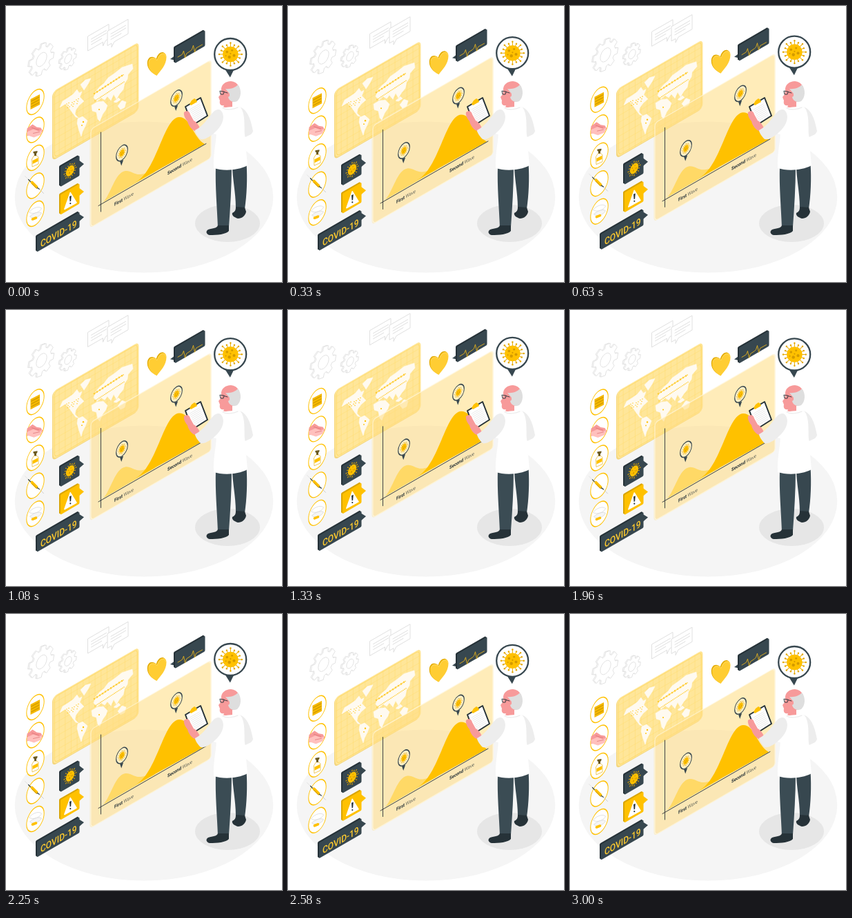
Animation of 400x400 px, one loop 3040 ms. Source, as an HTML page:

```html
<!DOCTYPE html>
<html lang="en">
<head>
<meta charset="utf-8">
<title>Two waves</title>
<style>
html, body { margin: 0; width: 100%; height: 100%; overflow: hidden; background: #fff; }
svg { display: block; width: 100vw; height: 100vh; }
text { font-family: Roboto, Inter, sans-serif; }
</style>
</head>
<body>
<svg id="stage" viewBox="0 0 400 400"></svg>
<script>
const GOLD = '#ffc100', DARK = '#37474f', INK = '#263238', LINE = '#e0e0e0', SKIN = '#f79a9a';
const SLOPE = 0.577, ISO = 0.866;

const path = (d, fill = 'none', extra = '') => `<path d="${d}" fill="${fill}" ${extra}/>`;
const line = (d, color, width = 1) =>
  path(d, 'none', `stroke="${color}" stroke-width="${width}" stroke-linecap="round" stroke-linejoin="round"`);
const circle = (x, y, r, fill, extra = '') => `<circle cx="${x}" cy="${y}" r="${r}" fill="${fill}" ${extra}/>`;
const iso = (x, y, content, sx = ISO) =>
  `<g transform="matrix(${sx} -0.5 0 1 ${x} ${y})">${content}</g>`;
const float = (amp, content, period = 3000) =>
  `<g class="float" data-amp="${amp}" data-period="${period}">${content}</g>`;

// Rounded isometric sheet: x, y is its top left corner, w its width on screen.
const sheet = (x, y, w, h, r, fill, extra = '') =>
  iso(x, y, `<rect width="${w / ISO}" height="${h}" rx="${r}" fill="${fill}" ${extra}/>`);

function virus(r) {
  let spikes = '';
  for (let i = 0; i < 16; i++) {
    const a = i * Math.PI / 8, reach = r * (i % 2 ? 1.28 : 1.45);
    const x = Math.cos(a) * reach, y = Math.sin(a) * reach;
    spikes += line(`M0 0L${x} ${y}`, '#e5a900', r * 0.09) + circle(x, y, r * 0.11, '#e5a900');
  }
  const spots = [[-.45, -.3, .16], [.2, -.5, .13], [.45, .15, .18], [-.15, .35, .2], [0, -.08, .1], [-.6, .2, .09]];
  return spikes + circle(0, 0, r, GOLD) +
    spots.map(([x, y, s]) => circle(x * r, y * r, s * r, '#d49b00')).join('');
}

function gear(r) {
  const points = [];
  for (let i = 0; i < 8; i++) {
    for (const [da, k] of [[-.28, .76], [-.18, 1], [.18, 1], [.28, .76]]) {
      const a = i * Math.PI / 4 + 0.2 + da;
      points.push(`${(Math.cos(a) * r * k).toFixed(1)} ${(Math.sin(a) * r * k).toFixed(1)}`);
    }
  }
  const style = `stroke="${LINE}" stroke-width=".9" stroke-linejoin="round"`;
  const shape = path(`M${points.join('L')}Z`, '#fff', style);
  return `<g transform="translate(-2 -1.2)">${shape}</g>${shape}` + circle(0, 0, r * .42, '#fff', style);
}

function bubble(x, y, w, h, tail) {
  const style = `stroke="${LINE}" stroke-width="1" stroke-linejoin="round"`;
  const outline = `M${x} ${y}l${w} ${-w * SLOPE}v${h}l${tail - w} ${(w - tail) * SLOPE}l-4 8v-5.7l${4 - tail} ${(tail - 4) * SLOPE}z`;
  let rows = '';
  for (const [dy, len] of [[5, .72], [9, .72], [13, .5]]) {
    rows += line(`M${x + 5} ${y + dy - 1}l${w * len} ${-w * len * SLOPE}`, LINE, 1);
  }
  return path(outline, '#fff', style) + rows;
}

function sign(x, y, w, h, front, side, content) {
  return sheet(x - 2, y - 1.2, w, h, 1.5, side) + sheet(x - 1, y - .6, w, h, 1.5, side) +
    sheet(x, y, w, h, 1.5, front) + content;
}

function waveMarker(x, y) {
  return path(`M${x - 3} ${y + 12}l2.2 6.5l3 -8.5z`, DARK) +
    iso(x, y, circle(0, 0, 10.4, '#fff0c6', `stroke="${DARK}" stroke-width="1.4"`) + virus(4.6), 0.8);
}

function badge(y, content) {
  return iso(42.5, y, circle(0, 0, 16.5, '#fff', `stroke="${GOLD}" stroke-width="1.3"`), 0.77) +
    `<g transform="translate(42.5 ${y})">${content}</g>`;
}

function worldMap() {
  const land = [
    'M78 147L82 138 90 133 97 128 103 121 106 126 110 124 107 132 113 138 106 144 101 151 100 157 105 162 101 161 95 153 91 147 86 142Z',
    'M104 163L111 160 118 166 115 174 111 182 109 189 106 181 103 170Z',
    'M108 114L115 107 123 105 119 113 113 122Z',
    'M127 133L130 124 136 117 142 112 148 104 158 97 168 89 183 84 184 91 177 99 176 106 172 112 170 121 165 127 160 135 156 128 152 137 147 131 143 136 138 133 132 138Z',
    'M124 144L132 139 141 138 147 144 145 150 140 157 136 167 133 164 131 154 125 152Z',
    'M162 145L168 137 174 139 172 147 166 150Z', 'M156 139L163 133 166 136 160 140Z'
  ];
  let grid = '', cases = '';
  for (let u = 10; u < 143; u += 10) grid += `M${u} 1v98`;
  for (let v = 10; v < 98; v += 10) grid += `M1 ${v}h141`;
  for (let i = 0; i < 44; i++) {
    const x = 128 + (i * 17) % 44, y = 137 - (x - 128) * .65 + (i * 11) % 22 - 10;
    cases += circle(x, y, i % 4 ? .8 : 1.3, '#ffcc33');
  }
  for (let i = 0; i < 14; i++) {
    cases += circle(88 + (i * 7) % 20, 145 - (i * 7) % 20 * .5 + (i * 5) % 9 - 3, .8, '#ffcc33');
  }
  cases += circle(112, 168, 1.2, GOLD) + circle(110, 173, .9, GOLD) + circle(135, 150, 1, GOLD);
  return sheet(67, 125.5, 124, 99, 6, '#f5cd55', 'opacity=".75"') +
    sheet(68.5, 123.5, 124, 99, 6, '#ffe699') +
    iso(68.5, 123.5, path(grid, 'none', 'stroke="#ffda6a" stroke-width=".6" opacity=".65"')) +
    sheet(70.5, 124.5, 120, 95, 5, 'none', 'stroke="#ffda6a" stroke-width=".9"') +
    path(land.join(''), '#fffaf0', 'stroke="#fffaf0" stroke-width=".5" stroke-linejoin="round"') + cases;
}

function board() {
  return sheet(121.5, 180, 174.5, 142, 5, '#ffd978', 'opacity=".3"') +
    sheet(123, 178.5, 174.5, 142, 5, '#ffde89', 'opacity=".38"') +
    sheet(123, 178.5, 174.5, 142, 5, 'none', 'stroke="#fff7dd" stroke-width="1.2" opacity=".85"');
}

function chart() {
  const label = (x, y, bold, light) => iso(x, y,
    `<text font-size="6.9" fill="${INK}"><tspan font-weight="700">${bold}</tspan><tspan font-weight="300"> ${light}</tspan></text>`);
  return path('M141 284C152 273 158 241 173 239C182 238 187 247 200 243L217 240Z', '#ffd966') +
    path('M187 256C219 240 228 162 251 161C268 161 271 191 288 200Z', GOLD) +
    line('M137.5 183V298M134 289.5L290 199.5', INK, .9) +
    label(157, 290, 'First', 'Wave') + label(234, 245, 'Second', 'Wave') +
    waveMarker(168, 213) + waveMarker(247, 133.5);
}

function heart() {
  const d = 'M218.5 101C213 98 206 93 206 84C206 75 213 72 219 77.5C222 66 232.5 65 232.5 74C232.5 86 223.5 94 218.5 101Z';
  return `<g transform="translate(-1.2 -1)">${path(d, '#e0a800')}</g>` + path(d, '#ffcd33') +
    line('M207 81C208 76 214 74 219 78.5C222 69 230 66 231.5 73', '#ffda66', .8);
}

function pulse() {
  return path('M246 71l-8 6l8 2z', DARK) + sign(245, 60.5, 43.5, 22.5, DARK, INK,
    line('M249 74l5 -3l1.5 -1l2 -5l2 10l2 -6l6 -4l2 -2l2 -6l2 10l2 -6l9 -5', '#e5b21c', .9));
}

function sideSigns() {
  const warning = path('M93.2 270.5L102 285 84.8 294.5Z', '#fff', 'stroke="#fff" stroke-width="1.5" stroke-linejoin="round"') +
    path('M92 276l2.8 -1.2l-.7 8l-1.5 .8z', INK) + circle(93.3, 286.2, 1.1, INK);
  const name = iso(50, 350, '<text font-size="13.9" font-weight="500" fill="#ffcb2e">COVID-19</text>');
  return path('M105 223l8 6l-8 7z', DARK) + sign(79, 233, 27.5, 29, DARK, INK, iso(93, 238.8, virus(7))) +
    path('M105 263l8 6l-8 7z', GOLD) + sign(79, 273.5, 27.5, 29, GOLD, '#d9a400', warning) +
    path('M105 301l8 5l-8 7z', DARK) + sign(45, 334, 61.5, 22.5, DARK, INK, name);
}

function badges() {
  const mask = path('M-7 -4L6.5 -11V4L-7 11Z', '#f5b900') +
    line('M-6 -1L5.5 -7M-6 3L5.5 -3M-6 7L5.5 1', '#b98700', .8);
  const wash = path('M-12 -2L-4 -8L2 -4L8 -3L11 2L4 7L-4 6L-12 9Z', SKIN) +
    path('M-12 3L-3 -1L5 2L10 0L8 7L-2 11L-11 8Z', '#ffc0bd') + line('M-5 -3L5 0M-3 5L6 3', '#d96f72', .7);
  const bottle = path('M-5 2L-2 -3H2L4.5 -1V9L-4.5 13Z', '#fff', 'stroke="#e5b21c" stroke-width=".7"') +
    path('M-4 4L4 0V5L-4 9Z', GOLD) + path('M-1.5 -3V-6L-3 -7V-9L3 -10V-8L1.5 -6V-3Z', '#6b5a20');
  const syringe = line('M-15 -14L-10 -9', LINE, .9) + line('M-10 -9L-6 -5', DARK, 1.2) + line('M-5 -5L2 2', GOLD, 4) +
    line('M-5 -3L2 4', '#b98700', .8) + line('M3 3L6 5', DARK, 1.4) + line('M6 5L12 11', '#bbb', .7);
  const outline = 'stroke="#d5d5d5" stroke-width=".7"';
  const pills = path('M-9 -2C-6 -7 4 -12 9 -8C8 -3 -3 2 -9 -2Z', '#fff', outline) +
    path('M-8 4C-4 0 5 -4 9 -1C7 4 -3 9 -8 4Z', '#f5f5f5', outline) + line('M-4 8L1 6', GOLD, 3.6);
  return [mask, wash, bottle, syringe, pills].map((icon, i) => badge(139 + i * 40.5, icon)).join('');
}

function pin() {
  return path('M317 91L324.8 103.5L331 91Z', DARK) +
    circle(325.2, 70, 23, '#fff', `stroke="${DARK}" stroke-width="2.3"`) +
    `<g transform="translate(325.4 70)">${virus(11.3)}</g>`;
}

function doctor() {
  const legs = path('M328 230L348.5 228C350 250 349 275 346 294L333 292C333 270 328 250 328 230Z', DARK) +
    path('M304 232L327 232C327 262 325 292 323 320L307 321C306 292 303 262 304 232Z', '#3b4c54');
  const shoes = path('M333 291L346 292L348 298C347 304 342 308 336 308C330 306 327 303 328 300C332 298 333 296 333 291Z', INK) +
    path('M307 318L323 318V326C319 331 306 332 295 332C290 331 289 326 293 324C300 322 306 322 307 318Z', INK);
  const arm = path('M311 151C317 157 317 169 305 181C299 187 288 195 282 193C277 188 274 183 274 180C286 174 292 163 300 154C304 150 308 149 311 151Z', '#ededed');
  const backArm = path('M338 146C352 150 356 171 358 181C357 187 350 188 347 190L342 182Z', '#ededed');
  const coat = path('M313 146C321 149 333 143 340 147C347 156 345 172 346 188L350 231C335 239 314 239 301 235C300 211 306 193 305 178C306 166 306 152 313 146Z', '#fff') +
    line('M314 148C320 151 330 150 336 147', '#ebebeb', 1.2);
  let rows = '';
  for (let i = 0; i < 8; i++) rows += line(`M${266.5 + i * .95} ${150 + i * 2.3}l14 -8.2`, '#dadada', .6);
  const clipboard = path('M260 146L282 133L292 159L270 173Z', '#fff', `stroke="${INK}" stroke-width="2" stroke-linejoin="round"`) +
    rows + path('M266 142L269 137L273 134L276 136L277 139L268 144Z', GOLD);
  const hand = path('M258 154C262 151 266 152 267 157L272 166C276 168 279 172 281 177L276 182C269 180 264 173 263 167C260 164 257 158 258 154Z', SKIN);
  const head = path('M312 123C311 114 318 109 326 109C337 110 341 120 338 130C336 137 331 139 328 139L328 147C323 150 318 149 315 147L316 144C311 145 309 142 310 137L308 132L311 128Z', SKIN) +
    path('M318 120C325 121 333 118 336 114C342 121 341 133 335 138C329 141 323 137 322 132L324 127Z', '#dedede') +
    circle(321.5, 129, 2.6, SKIN) +
    line('M310 123.5L311 128L315 128L316 124.5ZM316 124.5L321 126', INK, .9);
  return legs + shoes + backArm + head + coat + clipboard + hand + arm;
}

const stage = document.getElementById('stage');
stage.innerHTML =
  '<rect width="400" height="400" fill="#fff"/>' +
  '<ellipse cx="200" cy="277" rx="187.3" ry="109.5" fill="#f5f5f5"/>' +
  '<ellipse cx="321" cy="315" rx="47" ry="27" fill="#e6e6e6"/>' +
  float(8, iso(51.5, 77.5, gear(22), 0.83) + iso(90, 76.5, gear(14.8), 0.83), 1500) +
  float(16, bubble(118.5, 44, 30.5, 21, 26) + bubble(147, 36.5, 30, 21, 10)) +
  float(8, worldMap()) +
  float(8, heart() + pulse() + sideSigns() + badges()) +
  float(22, board()) +
  float(16, chart()) +
  float(8, pin()) +
  doctor();

const floats = [...stage.querySelectorAll('.float')].map(node => ({
  node, amp: +node.dataset.amp, period: +node.dataset.period
}));

const LOOP = 3040, STEP = 1000 / 24;

function draw(ms) {
  const time = Math.floor((ms % LOOP + 4) / STEP) * STEP;
  for (const { node, amp, period } of floats) {
    const phase = time % period / period;
    const rise = amp * (1 - Math.abs(2 * phase - 1));
    node.setAttribute('transform', `translate(0 ${-rise.toFixed(3)})`);
  }
}

const start = performance.now();
function tick() {
  draw(performance.now() - start);
  requestAnimationFrame(tick);
}
draw(0);
requestAnimationFrame(tick);
</script>
</body>
</html>
```
